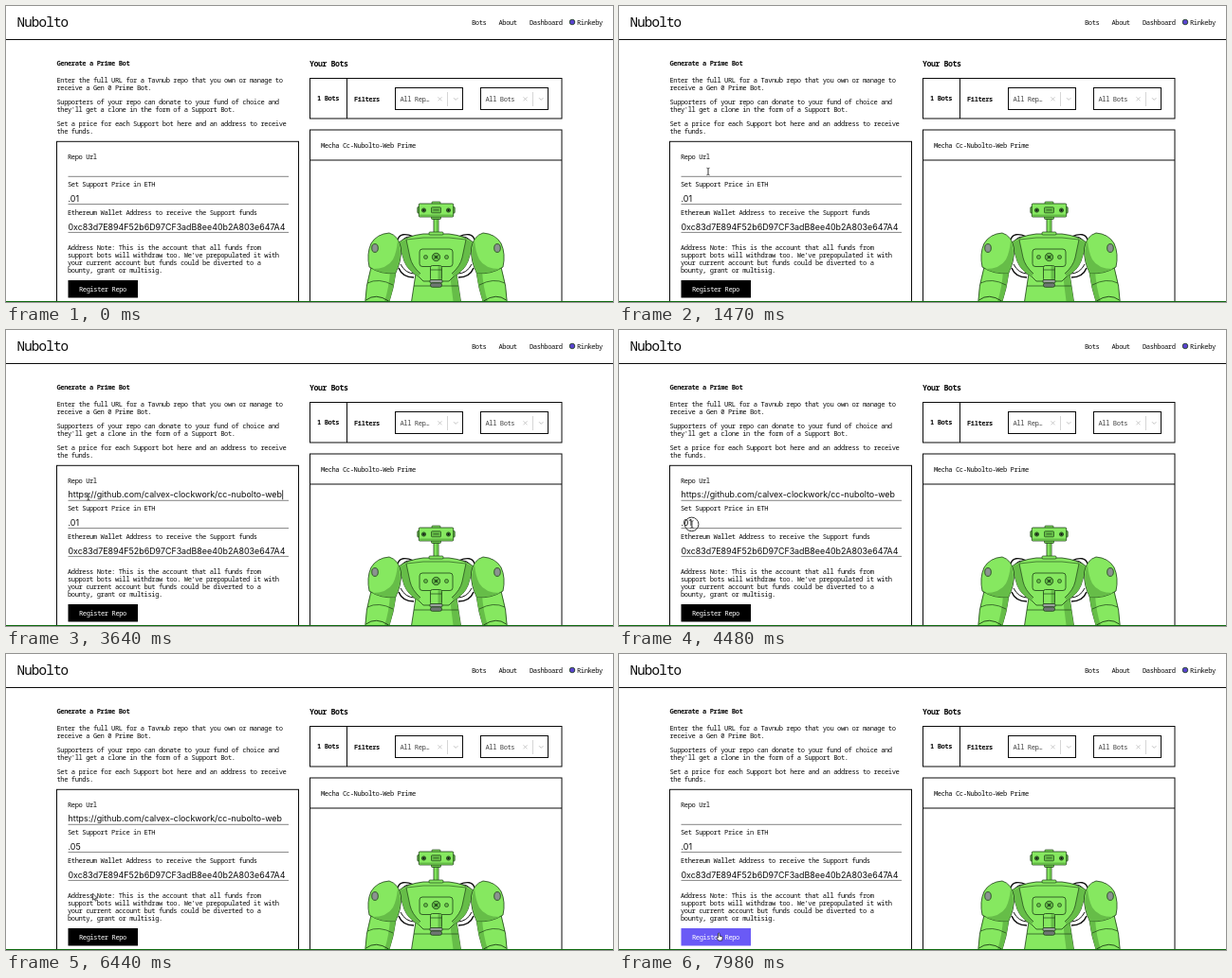
An HTML page with a canvas that plays this animation: 640x313 px, repeating every 8000 ms.

```html
<!DOCTYPE html>
<html lang="en">
<head>
<meta charset="utf-8">
<title>Register a bot</title>
<style>
  html, body { margin: 0; width: 100%; height: 100%; overflow: hidden; background: #fff; }
  canvas { display: block; width: 640px; height: 313px; }
</style>
</head>
<body>
<canvas id="stage"></canvas>
<script>
const W = 640, H = 313, LOOP = 8000, STEP = 70;
const canvas = document.getElementById('stage');
const ctx = canvas.getContext('2d');
const ratio = window.devicePixelRatio || 1;
canvas.width = W * ratio;
canvas.height = H * ratio;

const INK = '#0a0a0a';
const MONO = '"Noto Sans Mono", "DejaVu Sans Mono", monospace';
const SANS = 'Inter, "Liberation Sans", sans-serif';
const URL_TEXT = 'https://github.com/calvex-clockwork/cc-nubolto-web';
const WALLET = '0xc83d7E894F52b6D97CF3adB8ee40b2A803e647A4';

const GREEN = '#86e860', SHADE = '#66bd48', EDGE = '#1d3f17';
const AXIS = 453.5;

const clamp = v => Math.max(0, Math.min(1, v));
const ease = v => v * v * (3 - 2 * v);
const mix = (a, b, k) => a + (b - a) * k;

// ---- basic marks ----
function mono(text, x, y, { size = 7.11, color = INK, weight = 500 } = {}) {
  ctx.font = `${weight} ${size}px ${MONO}`;
  ctx.letterSpacing = `${-0.06 * size}px`;
  ctx.fillStyle = color;
  ctx.fillText(text, x, y);
}

function field(text, y) {
  ctx.font = `400 8.9px ${SANS}`;
  ctx.letterSpacing = '0px';
  ctx.fillStyle = INK;
  ctx.fillText(text, 65.5, y);
  return 65.5 + ctx.measureText(text).width;
}

function line(points, color = INK, width = 1) {
  ctx.beginPath();
  points.forEach(([x, y]) => ctx.lineTo(x, y));
  ctx.strokeStyle = color;
  ctx.lineWidth = width;
  ctx.stroke();
}

function frame(x, y, w, h) {
  ctx.strokeStyle = INK;
  ctx.lineWidth = 1;
  ctx.strokeRect(x, y, w, h);
}

function paint(fill, width = 0.8, stroke = EDGE) {
  if (fill) {
    ctx.fillStyle = fill;
    ctx.fill();
  }
  if (width) {
    ctx.strokeStyle = stroke;
    ctx.lineWidth = width;
    ctx.stroke();
  }
}

function box(x, y, w, h, r, fill, width) {
  ctx.beginPath();
  ctx.roundRect(x, y, w, h, r);
  paint(fill, width);
}

function oval(x, y, rx, ry, fill, width) {
  ctx.beginPath();
  ctx.ellipse(x, y, rx, ry, 0, 0, 7);
  paint(fill, width);
}

function shape(path, fill, width = 0.8, stroke = EDGE) {
  const p = new Path2D(path);
  if (fill) {
    ctx.fillStyle = fill;
    ctx.fill(p);
  }
  if (width) {
    ctx.strokeStyle = stroke;
    ctx.lineWidth = width;
    ctx.stroke(p);
  }
}

// ---- page ----
function header() {
  mono('Nubolto', 11.5, 22, { size: 14.22 });
  mono('Bots', 491, 20);
  mono('About', 519.5, 20);
  mono('Dashboard', 552, 20);
  mono('Rinkeby', 602, 20);
  oval(597, 17, 2.8, 2.8, '#5a44d0', 0.8);
  line([[0, 35.5], [W, 35.5]]);
}

function intro() {
  mono('Generate a Prime Bot', 53.5, 63, { weight: 700 });
  [
    ['Enter the full URL for a Tavnub repo that you own or manage to', 81],
    ['receive a Gen 0 Prime Bot.', 88.7],
    ['Supporters of your repo can donate to your fund of choice and', 103.7],
    ["they'll get a clone in the form of a Support Bot.", 111.6],
    ['Set a price for each Support bot here and an address to receive', 127],
    ['the funds.', 134.7],
  ].forEach(([text, y]) => mono(text, 53.5, y));
}

function select(x, label) {
  frame(x, 86.5, 71, 23);
  mono(label, x + 5, 101, { color: '#444' });
  const grey = '#bbb', cx = x + 47, cy = 98.3;
  line([[cx - 2, cy - 2], [cx + 2, cy + 2]], grey, 0.8);
  line([[cx + 2, cy - 2], [cx - 2, cy + 2]], grey, 0.8);
  line([[x + 55, 91], [x + 55, 106]], '#ccc', 0.8);
  line([[x + 61.5, 97.2], [x + 63.7, 99.4], [x + 65.9, 97.2]], grey, 0.9);
}

function botList() {
  mono('Your Bots', 320, 63.5, { size: 8.32, weight: 700 });
  frame(320.5, 76.5, 265.5, 42.5);
  line([[359.5, 76.5], [359.5, 119]]);
  mono('1 Bots', 328, 100, { weight: 700 });
  mono('Filters', 367, 101, { weight: 700 });
  select(410.5, 'All Rep…');
  select(500.5, 'All Bots');
  frame(320.5, 131, 265.5, 200);
  line([[320.5, 163], [586, 163]]);
  mono('Mecha Cc-Nubolto-Web Prime', 332, 149.5);
}

// ---- robot ----
function cables() {
  shape('M413 247 Q416 238 430 244', null, 1.3, '#111');
  shape('M416 251 Q420 241 432 245', null, 0.9, '#111');
  shape('M414 277 Q418 287 430 287', null, 1.5, '#111');
  shape('M416 273 Q421 283 431 283', null, 1, '#111');
}

function arm() {
  shape('M385 276 L411 281 Q409 298 403 316 L378.5 316 Q379 296 385 276 Z', GREEN);
  shape('M405 280 L411 281 Q409 298 403 316 L398 316 Q404 298 405 280 Z', SHADE, 0);
  shape('M381 293 Q393 287 408 295', null, 0.7);
  shape('M379.5 311 Q390 303 403.5 312', null, 0.9);

  shape('M385 251 Q391 241 404 240 Q414 243 416.5 256 Q417 271 410.5 282.5 Q395 284 383 276 Q380 262 385 251 Z', GREEN);
  shape('M413 248 Q417 258 415 268 Q413 277 410.5 282.5 Q397 283 386 278 Q402 278 408 268 Q412 260 413 248 Z', SHADE, 0);
  oval(389, 256, 3.3, 4.4, '#8b9390');
}

function mirrored(draw) {
  draw();
  ctx.save();
  ctx.translate(2 * AXIS, 0);
  ctx.scale(-1, 1);
  draw();
  ctx.restore();
}

function torso() {
  // abdomen
  shape('M432 283 L475 283 L480 316 L427 316 Z', GREEN);
  shape('M468 284 L475 283 L480 316 L472 316 Z', SHADE, 0);
  line([[430, 296], [477, 296]], EDGE, 0.7);

  // chest
  shape('M440 241 L467 241 Q484 243 493 250 L487 270 Q483 280 472 286 L467 291 L440 291 L435 286 Q424 280 420 270 L414 250 Q423 243 440 241 Z', GREEN);
  mirrored(() => {
    shape('M414 250 L420 270 Q424 280 435 286 L437 283 Q428 275 426 266 L422 247 Z', SHADE, 0);
    shape('M422 247 L426 266 Q428 275 437 283', null, 0.7);
  });
  line([[422, 247], [440, 245], [467, 245], [485, 247]], EDGE, 0.6);

  // control panel
  box(436, 257, 35, 18.5, 3, GREEN);
  oval(442.5, 265.5, 2, 2, SHADE, 0.7);
  oval(464.5, 265.5, 2, 2, SHADE, 0.7);
  oval(453.5, 265.5, 4.2, 4.2, SHADE);
  line([[450.5, 263], [456.5, 268]], EDGE, 0.7);
  line([[456.5, 263], [450.5, 268]], EDGE, 0.7);
  oval(453.5, 265.5, 1.3, 1.3, EDGE, 0);

  // nozzle
  box(447.5, 274.5, 12, 16, 2, GREEN);
  box(455.5, 275, 3.5, 15, 1, SHADE, 0);
  line([[447.5, 279], [459.5, 279]], EDGE, 0.7);
  box(447, 289.5, 13, 3.4, 1, '#9aa19d');
  box(447.5, 292.9, 12, 4.4, 2, '#6f7774');
}

function head() {
  box(451, 223, 5, 18, 0.5, GREEN);
  box(453.7, 226, 2, 14, 0, SHADE, 0);
  box(448.5, 222.5, 10, 3, 1, SHADE, 0.7);
  box(446, 239, 15, 3, 1, GREEN, 0.7);
  box(433.8, 212.5, 3, 6.5, 0.8, SHADE, 0.7);
  box(470.2, 212.5, 3, 6.5, 0.8, SHADE, 0.7);
  box(449, 207, 9, 2.5, 0.8, GREEN, 0.7);
  box(435.3, 209, 36.4, 14, 1, GREEN);
  box(436, 220.5, 35, 2, 0.5, SHADE, 0);
  for (const x of [440.5, 466.5]) {
    oval(x, 216, 2.1, 2.1, '#3f6b35', 0.8);
    oval(x, 216, 0.9, 0.9, '#111', 0);
  }
  box(448.5, 212.8, 10, 6, 0.8, SHADE, 0.7);
  line([[450.5, 215.8], [456.5, 215.8]], EDGE, 0.7);
}

function robot() {
  mirrored(cables);
  torso();
  mirrored(arm);
  head();
}

// ---- form ----
function priceAt(t) {
  if (t < 4830 || t >= 7700) return '.01';
  if (t < 5040) return '.0';
  return '.05';
}

function caret(x, y) {
  line([[x + 0.7, y - 8], [x + 0.7, y + 2]], INK, 0.8);
}

function form(t) {
  frame(53.5, 143.3, 255, 200);
  mono('Repo Url', 65, 161.5);
  mono('Set Support Price in ETH', 65, 191);
  mono('Ethereum Wallet Address to receive the Support funds', 65, 220.7);
  [180.3, 209.6, 239.4].forEach(y => line([[65.5, y], [298, y]], '#777', 0.9));

  const url = t >= 2450 && t < 7700 ? URL_TEXT : '';
  const urlEnd = field(url, 177.3);
  const priceEnd = field(priceAt(t), 207);
  field(WALLET, 236.5);
  const lit = t % 1060 < 730;
  if (t >= 1750 && t < 4340 && lit) caret(urlEnd, 177.3);
  if (t >= 4760 && t < 6300 && lit) caret(priceEnd, 207);

  [
    'Address Note: This is the account that all funds from',
    "support bots will withdraw too. We've prepopulated it with",
    'your current account but funds could be diverted to a',
    'bounty, grant or multisig.',
  ].forEach((text, i) => mono(text, 65, 257.5 + i * 8));

  const k = clamp((t - 6840) / 290);
  ctx.fillStyle = `rgb(${mix(0, 106, k)}, ${mix(0, 90, k)}, ${mix(0, 246, k)})`;
  ctx.fillRect(65.5, 290, 73.5, 18.5);
  mono('Register Repo', 77, 301.7, { color: '#fff' });
}

// ---- pointer ----
const STOPS = [
  [980, 150, 152], [1400, 94, 175], [1600, 94, 175], [1900, 88, 173],
  [3500, 88, 173], [4200, 77, 205.5], [6000, 76, 204], [6860, 106, 299], [LOOP, 106, 299],
];

function pointerAt(t) {
  const i = STOPS.findIndex(s => s[0] > t);
  const [t0, x0, y0] = STOPS[i - 1], [t1, x1, y1] = STOPS[i];
  const k = ease((t - t0) / (t1 - t0));
  return [mix(x0, x1, k), mix(y0, y1, k)];
}

function ring(x, y) {
  ctx.beginPath();
  ctx.arc(x, y, 7.3, 0, 7);
  paint(null, 1, '#333');
}

function pointer(t) {
  if (t < STOPS[0][0]) return;
  const [x, y] = pointerAt(t);
  const pressed = [[1680, 1820], [4340, 4620], [7280, 7420]].some(([a, b]) => t >= a && t < b);
  if (pressed) ring(x - 0.3, y);

  const inField = [170, 200, 229].some(top => y >= top && y < top + 11);
  ctx.save();
  ctx.translate(x, y);
  if (inField) {
    line([[0, -3.3], [0, 3.3]], '#222', 0.9);
    line([[-1.6, -3.8], [0, -3.1], [1.6, -3.8]], '#222', 0.7);
    line([[-1.6, 3.8], [0, 3.1], [1.6, 3.8]], '#222', 0.7);
  } else if (y > 290) {
    shape('M-1.5 -3.5 Q-.7 -4.4 0 -3.5 L0 -.8 L2.4 -.3 Q3.3 0 3.2 1 L2.6 4 L-1.2 4 L-3.2 1 Q-3 0 -1.5 1 Z', '#fff', 0.7, '#111');
  } else {
    shape('M0 0 L0 7 L1.6 5.5 L2.7 8 L3.8 7.5 L2.8 5.1 L5 5 Z', '#fff', 0.7, '#111');
  }
  ctx.restore();
}

function draw(now) {
  const t = Math.floor((now % LOOP) / STEP) * STEP;
  ctx.setTransform(ratio, 0, 0, ratio, 0, 0);
  ctx.fillStyle = '#fff';
  ctx.fillRect(0, 0, W, H);
  header();
  intro();
  botList();
  robot();
  form(t);
  pointer(t);
  ctx.fillStyle = '#0f6a0f';
  ctx.fillRect(0, 312, W, 1);
}

const start = performance.now();
function tick() {
  draw(performance.now() - start);
  requestAnimationFrame(tick);
}
tick();
</script>
</body>
</html>
```
